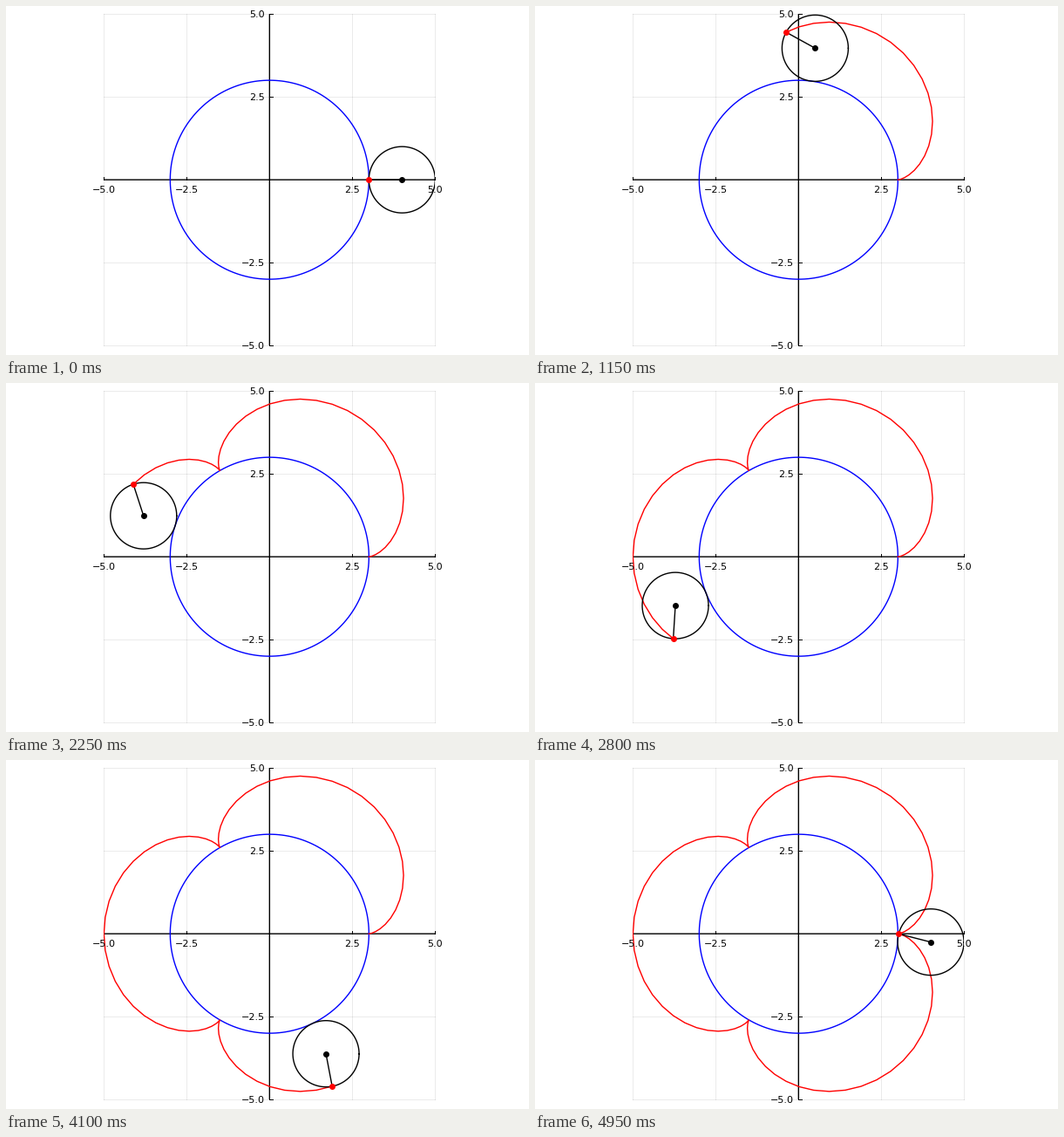
These frames come from a looping animation (600 by 400 pixels, 5 s). A matplotlib script:

```python
import numpy as np
import matplotlib.pyplot as plt
from matplotlib.animation import FuncAnimation

FRAMES = 100
W, H, DPI = 600, 400, 100
CX, CY, UNIT = 302.35, 199.15, 38  # origin and unit length in pixels
R, r = 3, 1                        # fixed and rolling radii
LIM = 5


def px(n):
    """Pixels to points."""
    return n * 72 / DPI


plt.rcParams["font.family"] = "DejaVu Sans"
fig = plt.figure(figsize=(W / DPI, H / DPI), dpi=DPI, facecolor="white")
half = LIM * UNIT
ax = fig.add_axes([(CX - half) / W, (H - CY - half) / H,
                   2 * half / W, 2 * half / H])
ax.set(xlim=(-LIM, LIM), ylim=(-LIM, LIM))
ax.axis("off")


def line(xs, ys, color, width=1.4, **kw):
    return ax.plot(xs, ys, color=color, lw=px(width), **kw)[0]


def dot(color):
    return line([], [], color, marker="o", ms=px(7), mew=0,
                ls="none", clip_on=False)


# grid, ticks and labels
tick = 3.5 / UNIT
for v in (-5, -2.5, 2.5, 5):
    grid = dict(color="black", width=1, alpha=0.08, clip_on=False)
    line([v, v], [-LIM, LIM], **grid)
    line([-LIM, LIM], [v, v], **grid)
    line([v, v], [0, tick], "black", 1, clip_on=False)
    line([0, tick], [v, v], "black", 1, clip_on=False)
    label = f"{v:.1f}".replace("-", "\u2212")
    ax.text(v, -15 / UNIT, label, size=8, ha="center", va="baseline")
    ax.text(-5.5 / UNIT, v - 4 / UNIT, label, size=8, ha="right", va="baseline")

line([-LIM, LIM], [0, 0], "black", snap=False, solid_capstyle="butt")
line([0, 0], [-LIM, LIM], "black", snap=False, solid_capstyle="butt")

turn = np.linspace(0, 2 * np.pi, 201)
line(R * np.cos(turn), R * np.sin(turn), "blue")

trace = line([], [], "red")
wheel = line([], [], "black")
arm = line([], [], "black", snap=False)
hub = dot("black")
pen = dot("red")

angles = 2 * np.pi * np.arange(FRAMES) / FRAMES
hub_x, hub_y = (R + r) * np.cos(angles), (R + r) * np.sin(angles)
spin = (R + r) / r * angles
pen_x, pen_y = hub_x - r * np.cos(spin), hub_y - r * np.sin(spin)


def update(i):
    x, y = hub_x[i], hub_y[i]
    trace.set_data(pen_x[:i + 1], pen_y[:i + 1])
    wheel.set_data(x + r * np.cos(turn), y + r * np.sin(turn))
    arm.set_data([x, pen_x[i]], [y, pen_y[i]])
    hub.set_data([x], [y])
    pen.set_data([pen_x[i]], [pen_y[i]])
    return trace, wheel, arm, hub, pen


anim = FuncAnimation(fig, update, frames=FRAMES, interval=50,
                     repeat=True, repeat_delay=0)
plt.show()
```
